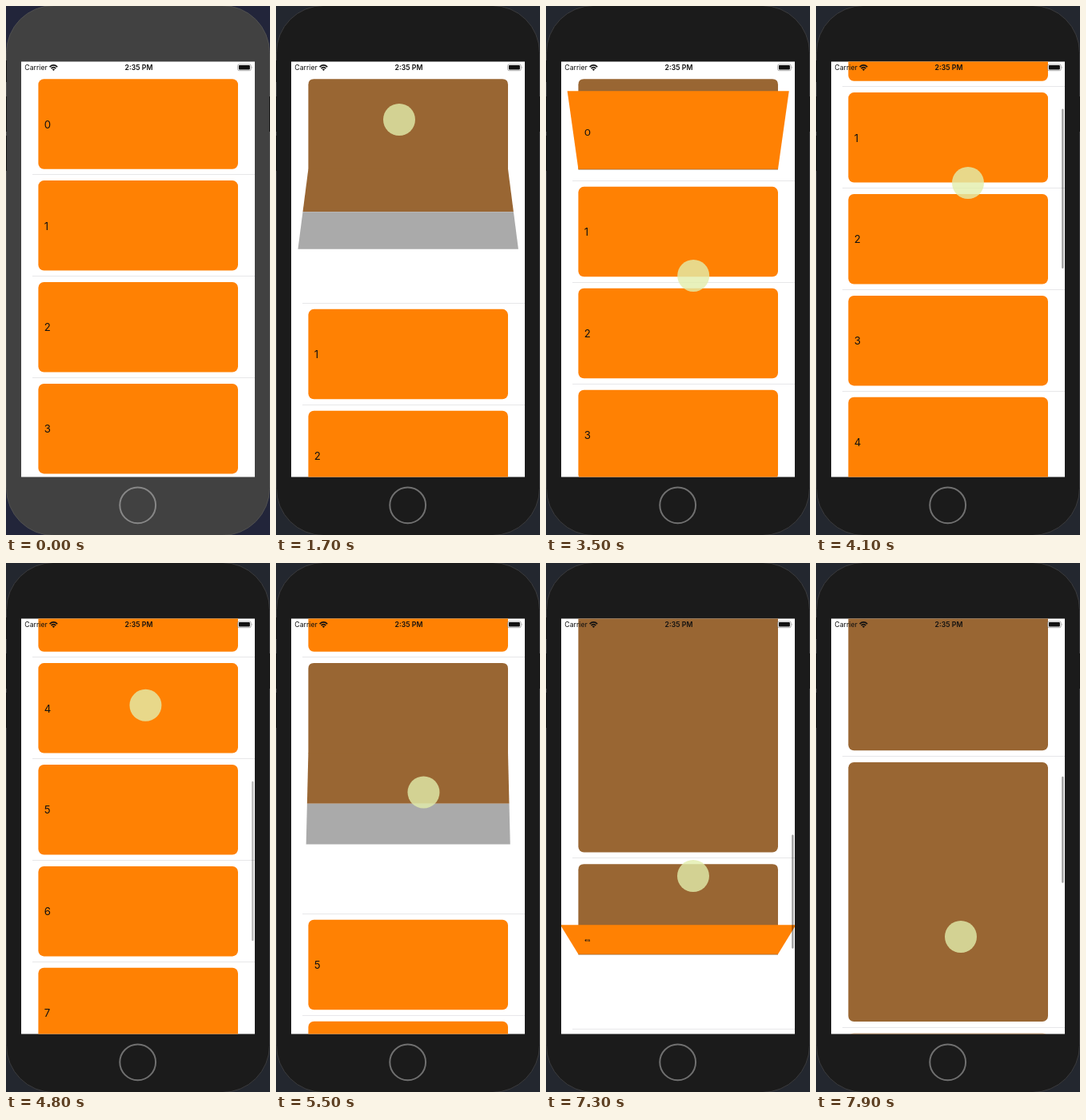
Write an HTML page that moves like this. It is 330 px wide and 661 px high and loops after 8 s.

```html
<!DOCTYPE html>
<html lang="en">
<head>
<meta charset="utf-8">
<title>Folding cells</title>
<style>
  html, body { margin: 0; width: 100%; height: 100%; overflow: hidden; background: #23272f; }
  svg { display: block; width: 330px; height: 661px; font-family: Inter, Roboto, sans-serif; }
</style>
</head>
<body>
<svg viewBox="0 0 330 661">
  <defs>
    <clipPath id="screen"><rect x="19" y="69.5" width="292" height="519"/></clipPath>
  </defs>
  <rect id="desk" width="330" height="661"/>
  <rect id="body" x="0.5" y="-0.5" width="329" height="662" rx="59"/>
  <g fill="#171717">
    <rect y="68" width="1" height="27"/>
    <rect y="113" width="1" height="44"/>
    <rect y="162" width="1" height="44"/>
    <rect x="329" y="113" width="1" height="44"/>
  </g>
  <circle id="home" cx="164.7" cy="623.8" r="22.4" fill="none" stroke-width="2"/>
  <rect x="19" y="69.5" width="292" height="519" fill="#fff"/>
  <g clip-path="url(#screen)">
    <g id="table"></g>
    <rect id="bar" x="307.2" width="2.4" rx="1.2" fill="#000"/>
  </g>
  <g fill="#111" font-size="8.7">
    <text x="23.3" y="80.2">Carrier</text>
    <text x="166" y="80.2" text-anchor="middle" font-weight="600">2:35 PM</text>
    <g fill="none" stroke="#111" stroke-width="1.7">
      <path d="M54.6 76.1Q59.4 71.7 64.2 76.1"/>
      <path d="M56.5 78Q59.4 75.4 62.3 78"/>
    </g>
    <path d="M57.6 79.1Q59.4 77.7 61.2 79.1L59.4 81Z"/>
    <rect x="289.6" y="72.9" width="16.6" height="7.8" rx="1.9" fill="none" stroke="#888" stroke-width=".7"/>
    <rect x="290.9" y="74" width="14" height="5.6" rx="1"/>
    <path d="M307 75.6Q308.2 76.8 307 78Z" fill="#888"/>
  </g>
  <circle id="dot" r="20" fill="#e3eeac" fill-opacity=".8"/>
</svg>
<script>
const $ = id => document.getElementById(id);
const LOOP = 8000, STEP = 100;
const ORANGE = '#ff8103', BROWN = '#996633', GRAY = '#aaaaaa';
const ROW = 126.9, GROWTH = 211.8, TOP = 84, ROWS = 10, VIEW = 503;
const CX = 165.2, HALF = 124.8, HEAD = 112.5, FLAP = 49.5, DEPTH = 708;

const clamp = x => Math.min(1, Math.max(0, x));
const mix = (a, b, k) => a + (b - a) * k;

// cubic-bezier(0, 0, .58, 1)
function easeOut(x) {
  let lo = 0, hi = 1;
  for (let i = 0; i < 18; i++) {
    const s = (lo + hi) / 2;
    if (1.74 * s * s * (1 - s) + s ** 3 < x) lo = s; else hi = s;
  }
  return lo * lo * (3 - 2 * lo);
}
const easeIn = x => 1 - easeOut(1 - x);
const linear = x => x;
const smooth = x => x * x * (3 - 2 * x);
const cubicOut = x => 1 - (1 - x) ** 3;

// Keys are [time, value, easing towards this key].
function track(keys, t) {
  const i = keys.findIndex(k => k[0] > t);
  if (i < 0) return keys[keys.length - 1][1];
  if (i === 0) return keys[0][1];
  const [t0, a] = keys[i - 1], [t1, b, ease = smooth] = keys[i];
  const k = ease((t - t0) / (t1 - t0));
  return Array.isArray(a) ? a.map((v, n) => mix(v, b[n], k)) : mix(a, b, k);
}

const DOT = [
  [0.2, [70, 513]], [0.45, [196, 28], linear],
  [0.9, [180, -10]], [1.3, [154, 142]], [1.7, [154, 142]], [2.8, [167, 158]],
  [3.6, [185, 345]], [3.85, [188, 331]], [4.1, [190, 221], easeIn], [4.3, [174, 176], cubicOut],
  [4.75, [174, 176]], [5.05, [180, 200]], [5.5, [184.5, 286.5]], [5.95, [187, 510]],
  [6.1, [187, 515]], [6.35, [188, 627]], [6.6, [189, 440]], [6.8, [186, 250]],
  [7.1, [184, 400]], [7.35, [184, 390]], [7.65, [183, 627]], [7.9, [181, 467]]
];
const SCROLL = [
  [3.85, 0], [4.1, 110, easeIn], [4.65, 473.7, cubicOut],
  [6.6, 473.7], [6.8, 700, easeIn], [7.05, 900, cubicOut],
  [7.35, 900], [7.9, 688.5, easeOut]
];
const BAR = [[3.8, 0], [3.9, 1], [4.7, 1], [5, 0], [6.6, 0], [6.7, 1]];
const OPENED = { 0: 1.38, 4: 5.104, 5: 6.05, 6: 7.1 };
const CLOSED = { 0: 2.82 };

// Number of folds undone, 0 to 3, given the time and the length of each fold.
function foldCount(t, lengths) {
  let n = 0;
  for (const d of lengths) {
    n += clamp(t / d);
    t -= d;
  }
  return n;
}

function rowState(i, t) {
  if (t >= CLOSED[i]) {
    const since = t - CLOSED[i];
    return { grown: 1 - easeOut(clamp(since / 0.8)), folds: 3 - foldCount(since, [0.2, 0.2, 0.4]) };
  }
  if (t >= OPENED[i]) {
    const since = t - OPENED[i];
    return { grown: easeOut(clamp((since - 0.091) / 0.4)), folds: foldCount(since, [0.45, 0.35, 0.35]) };
  }
  return { grown: 0, folds: 0 };
}

// Strip between distances a and b from a hinge, tilted towards the viewer.
function strip(color, hinge, a, b, angle) {
  const edge = d => {
    const s = 1 / (1 - Math.abs(d) * Math.sin(angle) / DEPTH);
    return { y: hinge + d * Math.cos(angle) * s, w: HALF * s };
  };
  const p = edge(a), q = edge(b);
  return `<path fill="${color}" d="M${CX - p.w} ${p.y}H${CX + p.w}L${CX + q.w} ${q.y}H${CX - q.w}Z"/>`;
}

const roundCard = (color, y, h) =>
  `<rect x="${CX - HALF}" y="${y}" width="${2 * HALF}" height="${h}" rx="7" fill="${color}"/>`;

const topCard = (y, h) =>
  `<path fill="${BROWN}" d="M${CX - HALF} ${y + h}v${7 - h}q0-7 7-7h${2 * HALF - 14}q7 0 7 7v${h - 7}Z"/>`;

const label = (i, y) => `<text x="47.8" y="${y}" font-size="13.2" fill="#111">${i}</text>`;

function cell(i, y, folds) {
  if (folds <= 0) return roundCard(ORANGE, y, HEAD) + label(i, y + 61.4);
  if (folds >= 3) return roundCard(BROWN, y, 2 * HEAD + 2 * FLAP);

  const stage = Math.floor(folds), f = folds - stage;
  const lifting = f < 0.5;
  const angle = Math.PI / 2 * (lifting ? easeIn(2 * f) : 1 - easeOut(2 * f - 1));
  const done = [HEAD, 2 * HEAD, 2 * HEAD + FLAP][stage];
  const hinge = y + done;
  // A slight overlap hides the seam at the hinge.
  let out = topCard(y, done + 0.7);

  if (lifting) {
    if (stage > 0) return out + strip(GRAY, hinge, -FLAP, 0, angle);
    const squash = Math.cos(angle) / (1 - HEAD / 2 * Math.sin(angle) / DEPTH);
    return out + strip(ORANGE, hinge, -HEAD, 0, angle) +
      `<g transform="translate(0 ${hinge}) scale(1 ${squash})">${label(i, 61.4 - HEAD)}</g>`;
  }
  if (stage === 0) {
    return out + strip(BROWN, hinge, 0, HEAD - FLAP, angle) + strip(GRAY, hinge, HEAD - FLAP, HEAD, angle);
  }
  return out + strip(stage === 1 ? GRAY : BROWN, hinge, 0, FLAP, angle);
}

function draw(ms) {
  const t = ms / 1000;
  const active = t >= 0.8;
  $('desk').setAttribute('fill', active ? '#23272f' : '#22253a');
  $('body').setAttribute('fill', active ? '#1b1b1b' : '#414141');
  $('body').setAttribute('stroke', active ? '#3b3b3d' : '#505050');
  $('home').setAttribute('stroke', active ? '#707070' : '#878787');

  const scroll = track(SCROLL, t);
  let y = TOP - scroll, content = 0, lines = '';
  const cells = [];
  for (let i = 0; i < ROWS; i++) {
    const { grown, folds } = rowState(i, t);
    const height = ROW + GROWTH * grown;
    if (y < 600 && y + height > 60) {
      cells.push(cell(i, y + 7.2, folds));
      lines += `<rect x="33" y="${y + height - 0.5}" width="278" height=".5" fill="#cfced3"/>`;
    }
    y += height;
    content += height;
  }
  $('table').innerHTML = lines + cells.reverse().join('');

  $('bar').setAttribute('y', 85 + scroll / content * VIEW);
  $('bar').setAttribute('height', VIEW * VIEW / content);
  $('bar').setAttribute('opacity', 0.38 * track(BAR, t));

  const [x, dy] = track(DOT, t);
  $('dot').setAttribute('cx', x);
  $('dot').setAttribute('cy', dy);
  $('dot').setAttribute('opacity', t < 0.2 || (t >= 0.5 && t < 0.9) ? 0 : 1);
}

const start = performance.now();
function tick() {
  const ms = (performance.now() - start) % LOOP;
  draw(Math.floor(ms / STEP) * STEP);
  requestAnimationFrame(tick);
}
tick();
</script>
</body>
</html>
```
